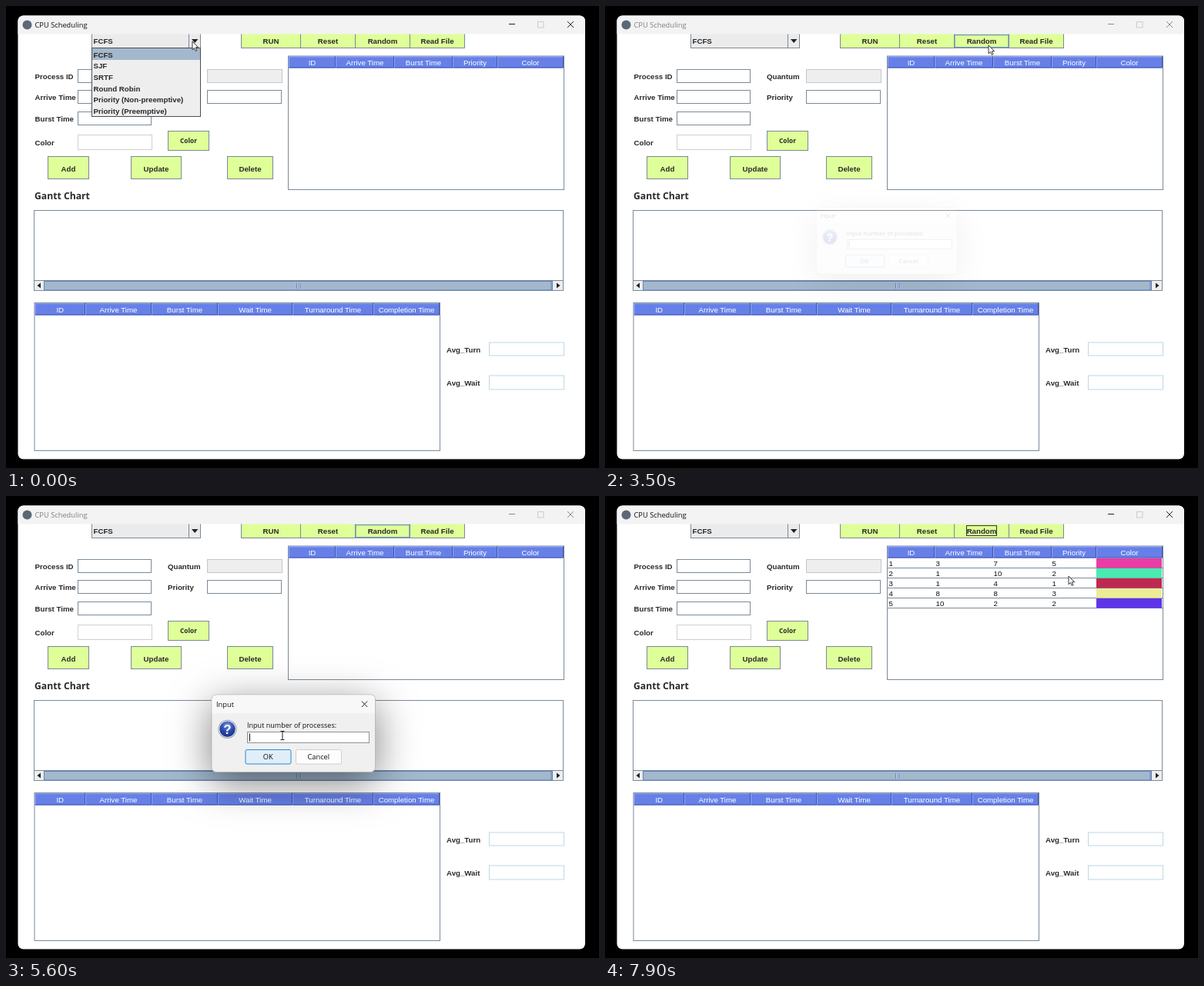
Recreate the animation shown at these times as an HTML page. Size 770 by 600 pixels, loop 8 s.

```html
<!DOCTYPE html>
<html lang="en">
<head>
<meta charset="utf-8">
<title>CPU Scheduling</title>
<style>
  html, body { margin: 0; width: 100%; height: 100%; overflow: hidden; background: #000; }
  svg { display: block; width: 770px; height: 600px; }
  text { font: 9.7px "Liberation Sans", Arial, sans-serif; fill: #111; white-space: pre; }
  .b { font-weight: bold; fill: #2a2a2a; }
  .ui { font: 9.3px "Open Sans", "Noto Sans", sans-serif; }
  .head { font: bold 12.2px "Noto Sans", "Open Sans", sans-serif; fill: #2a2a2a; }
  .small { font: bold 8.3px "Noto Sans", "Open Sans", sans-serif; }
  .w { fill: #fff; }
  .mid { text-anchor: middle; }
  .shadow { filter: drop-shadow(0 13px 26px rgba(0, 0, 0, .5)); }
</style>
</head>
<body>
<svg id="stage" viewBox="0 0 770 600"></svg>
<script>
const LOOP = 8000, STEP = 100;
const EDGE = '#7a8a99', STEEL = '#a3b8cc', LIME = '#dfff99', BLUE = '#6680e8';

const box = (x, y, x2, y2, fill, stroke = 'none', extra = '') =>
  `<rect x="${x}" y="${y}" width="${x2 - x}" height="${y2 - y}" fill="${fill}" stroke="${stroke}" ${extra}/>`;
const line = (d, stroke, extra = '') => `<path d="${d}" fill="none" stroke="${stroke}" ${extra}/>`;
const text = (s, x, y, cls = 'b') => `<text x="${x}" y="${y}" class="${cls}">${s}</text>`;
const group = (id, inner) => `<g id="${id}">${inner}</g>`;
const button = (s, x, y, x2, y2, base, cls = 'b mid') =>
  box(x, y, x2, y2, LIME, EDGE) + text(s, (x + x2) / 2, base, cls);

// Column header strip: edges holds one more entry than names
function header(names, edges, y, y2) {
  const cells = names.map((s, i) => {
    const a = edges[i], b = edges[i + 1];
    return line(`M${a + .5} ${y2}V${y + .5}H${b - 1}`, '#93a6f2') +
      line(`M${a + .5} ${y2 - .5}H${b - .5}V${y}`, '#4054a8') +
      text(s, (a + b) / 2, y2 - 3.6, 'w mid');
  });
  return box(edges[0], y, edges[edges.length - 1], y2, BLUE) + cells.join('');
}

function form() {
  const labels = [['Process ID', 37.5, 95], ['Arrive Time', 37.5, 122], ['Burst Time', 37.5, 150],
    ['Color', 37.5, 181], ['Quantum', 210, 95], ['Priority', 210, 122],
    ['Avg_Turn', 572, 450], ['Avg_Wait', 572, 493]];
  return labels.map(l => text(...l)).join('') +
    box(93.5, 82.5, 188.5, 99.5, '#fff', EDGE) +
    box(93.5, 109.5, 188.5, 126.5, '#fff', EDGE) +
    box(93.5, 137.5, 188.5, 154.5, '#fff', EDGE) +
    box(93.5, 167.5, 189.5, 186.5, '#fff', '#ccd0d4') +
    box(261.5, 82.5, 358.5, 99.5, '#eee', '#c4c8cc') +
    box(261.5, 109.5, 357.5, 126.5, '#fff', EDGE) +
    box(627.5, 437, 724.5, 454, '#fff', '#bcd8e6') +
    box(627.5, 480, 724.5, 498, '#fff', '#bcd8e6') +
    button('Color', 210.5, 162.5, 263.5, 187.5, 178, 'b small mid') +
    button('Add', 54.5, 195.5, 107.5, 224.5, 214.5) +
    button('Update', 162.5, 195.5, 227.5, 224.5, 214.5) +
    button('Delete', 287.5, 195.5, 346.5, 224.5, 214.5) +
    text('Gantt Chart', 37, 251, 'head');
}

function toolbar() {
  return box(111.5, 30, 252.5, 54.5, '#ebebeb', EDGE) +
    group('focus', box(112, 36, 237, 54, STEEL)) +
    line('M237.5 36V54', EDGE) +
    '<path d="M241 43H249.5L245.2 48Z" fill="#222"/>' +
    text('FCFS', 113.5, 49) +
    button('RUN', 305.5, 30, 382.5, 54.5, 49) +
    button('Reset', 382.5, 30, 453.5, 54.5, 49) +
    button('Random', 453.5, 30, 524.5, 54.5, 49) +
    button('Read File', 524.5, 30, 595.5, 54.5, 49) +
    group('hover', box(454, 37.5, 524, 53.8, 'none', '#6f93bd', 'stroke-width="1.4"')) +
    group('picked', box(469.5, 38.5, 508.5, 51.5, 'none', '#333'));
}

function gantt() {
  return box(36.5, 265.5, 723.5, 369.5, '#fff', EDGE) +
    box(37, 357, 723, 369, '#eee') + line('M37 356.5H723', EDGE) +
    box(49.5, 357.5, 709.5, 369, STEEL, '#6382bf') +
    line('M708 358V369', '#6382bf') +
    line('M377.5 360V367M379.5 360V367M381.5 360V367', '#6382bf') +
    line('M378.5 360V367M380.5 360V367', '#dbe6f2') +
    '<path d="M45 359.5V366.5L40.5 363ZM715 359.5V366.5L719.5 363Z" fill="#222"/>';
}

function rows() {
  const data = [[3, 7, 5, '#ea3ca6'], [1, 10, 2, '#4aeab0'], [1, 4, 1, '#bf2851'],
    [8, 8, 3, '#ecec98'], [10, 2, 2, '#5e34ea']];
  return data.map(([arrive, burst, rank, color], i) => {
    const y = 81 + 13 * i;
    return [i + 1, arrive, burst, rank]
      .map((v, k) => text(v, [368.5, 429.5, 504.5, 580.5][k], y + 10.4, '')).join('') +
      line(`M367 ${y + 12.5}H724`, EDGE) + box(638, y, 723, y + 12.5, color);
  }).join('');
}

function tables() {
  return box(366.5, 65, 724.5, 238.5, '#fff', EDGE) +
    header(['ID', 'Arrive Time', 'Burst Time', 'Priority', 'Color'],
      [367, 428, 504, 580, 638, 724], 65.5, 80.5) +
    group('rows', rows()) +
    box(37, 385.5, 563.5, 577.5, '#fff', EDGE) +
    header(['ID', 'Arrive Time', 'Burst Time', 'Wait Time', 'Turnaround Time', 'Completion Time'],
      [37.5, 103, 189, 275, 372, 477, 563], 386, 401.5);
}

function popup() {
  const items = ['FCFS', 'SJF', 'SRTF', 'Round Robin', 'Priority (Non-preemptive)', 'Priority (Preemptive)'];
  return box(111.5, 54.5, 252.5, 143.5, '#eee', '#4a4f55') +
    box(112, 55, 252, 70, STEEL) +
    items.map((s, i) => text(s, 113.5, 66.7 + 14.6 * i)).join('');
}

function titleBar() {
  return '<path d="M15.5 36.5V19.5a7 7 0 0 1 7-7H745a7 7 0 0 1 7 7V36.5Z" fill="#f3f3f3"/>' +
    '<circle cx="27.5" cy="24.5" r="6" fill="#5b6878"/>' +
    group('caption', text('CPU Scheduling', 37.5, 27.7, 'ui') +
      line('M653 23.5H661M729 20L737 28M737 20L729 28', '#222')) +
    box(690.5, 20.5, 698, 28, 'none', '#ccc');
}

function dialog() {
  return box(267, 258, 479.5, 358.5, '#f0f0f0', '#b4b4b4', 'rx="6" stroke-width=".8" class="shadow"') +
    '<path d="M267.5 282.5V264a5.5 5.5 0 0 1 5.5-5.5H473.5a5.5 5.5 0 0 1 5.5 5.5V282.5Z" fill="#f8f8f8"/>' +
    text('Input', 273, 274, 'ui') +
    line('M461.8 266.5L469.2 274M469.2 266.5L461.8 274', '#222') +
    '<circle cx="287.5" cy="302.7" r="12" fill="#8d939c"/><circle cx="287.5" cy="302.7" r="11.2" fill="#e4e8f0"/>' +
    '<circle cx="287.5" cy="302.7" r="10.2" fill="url(#orb)"/>' +
    '<text x="287.5" y="309" class="mid" style="font-weight:bold;font-size:17px;fill:#fff">?</text>' +
    text('Input number of processes:', 313, 300.5, 'ui" style="font-size:9.05px') +
    box(313.5, 306.5, 471.5, 320.5, '#fff', '#8b9199') +
    group('typed', text('5', 316, 316.9, 'ui" style="font-size:8.8px')) +
    group('caret', line('M0 308.5V318.5', '#111')) +
    box(311, 329.5, 370, 348, '#e0eef9', '#2b8ad0', 'id="ok" rx="2"') +
    group('pressed', box(311.5, 330, 369.5, 347.5, 'none', '#1673c4', 'rx="1.5" stroke-width="1.8"') +
      box(313.5, 332, 367.5, 345.5, 'none', '#222', 'stroke-dasharray="1 1"')) +
    box(376.5, 329.5, 435.5, 348, '#fdfdfd', '#cfcfcf', 'rx="2"') +
    text('OK', 340.2, 342, 'ui mid') + text('Cancel', 405.8, 342, 'ui mid');
}

const stage = document.getElementById('stage');
stage.innerHTML =
  `<defs><radialGradient id="orb" cx=".5" cy=".25" r=".8">
    <stop offset="0" stop-color="#6f8fe0"/><stop offset=".55" stop-color="#2a48a8"/><stop offset="1" stop-color="#1b2f86"/>
  </radialGradient></defs>` +
  box(15.5, 12.5, 752, 588.5, '#fff', 'none', 'rx="7"') +
  form() + toolbar() + gantt() + tables() + group('popup', popup()) + titleBar() +
  group('dialog', dialog()) +
  group('arrow', '<path d="M0 0V10.8L2.5 8.5L4.2 12.4L6 11.6L4.3 7.8H7.7Z" fill="#fff" stroke="#222" stroke-width=".9"/>') +
  group('beam', line('M-2.5 -5.5H2.5M0 -5.5V5.5M-2.5 5.5H2.5', '#222'));

const part = {};
stage.querySelectorAll('[id]').forEach(el => part[el.id] = el);

// Pointer stops: time, x, y
const path = [[0, 242, 46], [600, 242, 46], [1000, 248, 64], [2000, 248, 64], [2900, 498, 51],
  [3600, 498, 51], [4200, 416, 237], [4600, 359, 311], [5900, 359, 311], [6300, 342, 337],
  [6900, 342, 337], [7700, 602, 104], [LOOP, 602, 104]];
// Dialog stages: time, opacity, scale
const fade = [[0, 0, 1], [3500, .12, .861], [3600, .8, .975], [3700, 1, 1],
  [6700, .6, .96], [6800, 0, 1]];

function pointer(t) {
  const i = path.findIndex(p => p[0] > t);
  const [t0, x0, y0] = path[i - 1], [t1, x1, y1] = path[i];
  const k = (t - t0) / (t1 - t0), e = k * k * (3 - 2 * k);
  return [x0 + (x1 - x0) * e, y0 + (y1 - y0) * e];
}

const show = (id, on) => { part[id].style.display = on ? '' : 'none'; };
const within = (t, a, b) => t >= a && t < b;

function draw(t) {
  const [x, y] = pointer(t);
  const modal = within(t, 3400, 6800);
  const inField = modal && y > 306 && y < 321;
  show('arrow', !inField);
  show('beam', inField);
  part[inField ? 'beam' : 'arrow'].setAttribute('transform', `translate(${x} ${y})`);

  show('popup', t < 1400);
  show('focus', within(t, 1400, 3300));
  show('hover', within(t, 2800, 6800));
  show('picked', within(t, 3300, 3400) || t >= 6800);
  show('rows', t >= 6900);
  part.caption.setAttribute('opacity', modal ? .5 : 1);

  const [, alpha, scale] = fade.filter(f => f[0] <= t).pop();
  show('dialog', alpha > 0);
  part.dialog.setAttribute('opacity', alpha);
  part.dialog.setAttribute('transform', `translate(320 284.5) scale(${scale}) translate(-320 -284.5)`);

  const typed = t >= 5800;
  show('typed', typed);
  show('caret', t < 6400 && (t - 3500) % 1000 < 500);
  part.caret.setAttribute('transform', `translate(${typed ? 321.5 : 316.5} 0)`);
  show('pressed', t >= 6400);
  const glow = t >= 6300 ? 1 : .5 - .5 * Math.cos((t - 4200) / 2800 * 2 * Math.PI);
  part.ok.setAttribute('fill', `rgb(${244 - 20 * glow} ${248 - 10 * glow} ${251 - 2 * glow})`);
}

const start = performance.now();
function tick() {
  const t = (performance.now() - start) % LOOP;
  draw(Math.floor(t / STEP) * STEP);
  requestAnimationFrame(tick);
}
tick();
</script>
</body>
</html>
```
